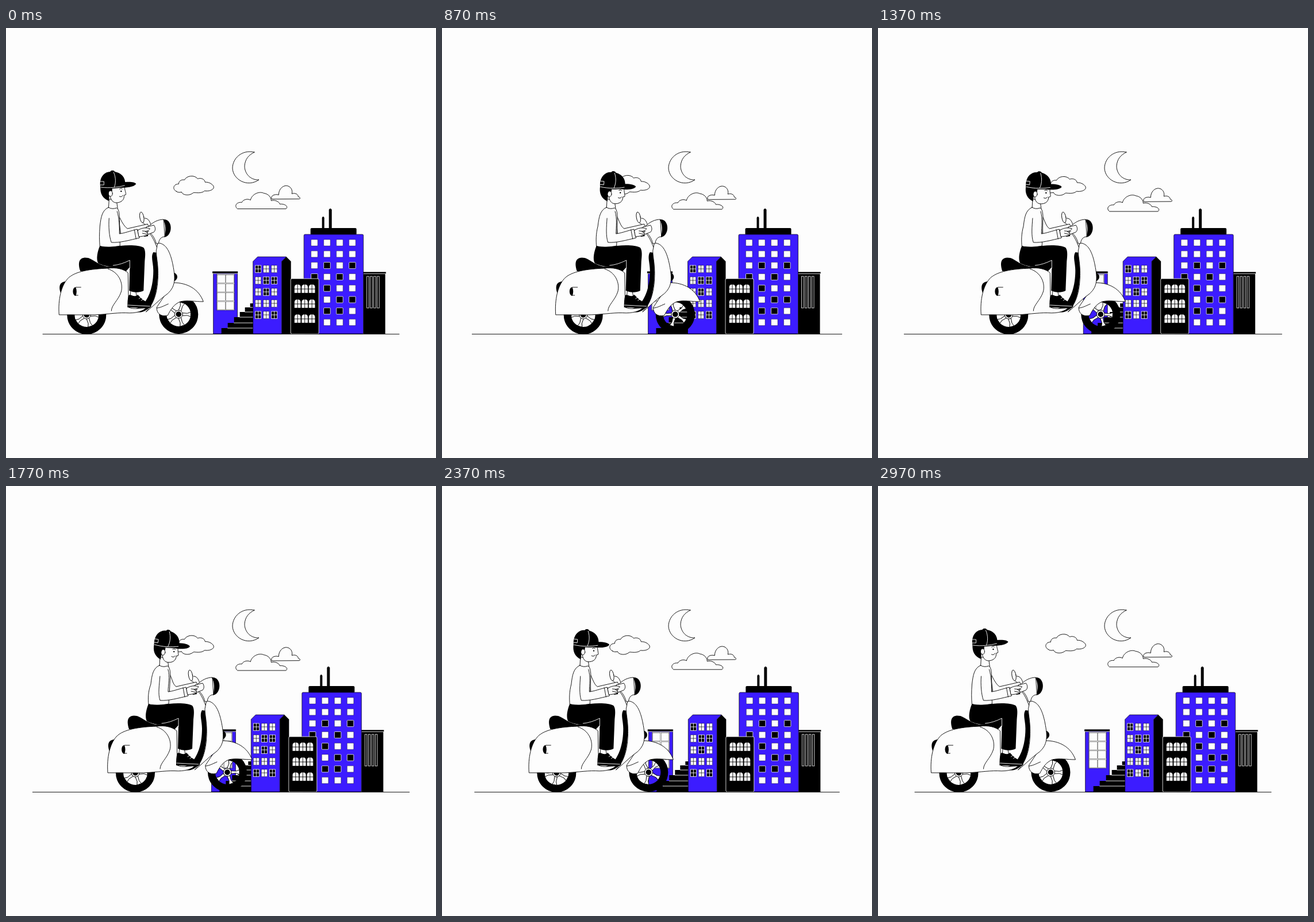
An HTML page that plays this animation: 748x748 px, repeating every 3000 ms.

```html
<!DOCTYPE html>
<html lang="en">
<head>
<meta charset="utf-8">
<title>Scooter ride</title>
<style>
  html, body { margin: 0; width: 100%; height: 100%; overflow: hidden; background: #fdfdfd; }
  svg { display: block; width: 100vw; height: 100vh; }
  .o { fill: #fdfdfd; stroke: #000; stroke-width: .9; stroke-linejoin: round; stroke-linecap: round; }
  .l { fill: none; stroke: #000; stroke-width: .9; stroke-linecap: round; }
  .w { fill: none; stroke: #fdfdfd; stroke-width: .9; stroke-linecap: round; }
  .b { fill: #3c1cff; stroke: #000; stroke-width: .7; }
  .p { fill: #fdfdfd; stroke: #000; stroke-width: .4; }
  .k { fill: #000; stroke: #fdfdfd; stroke-width: .8; }
</style>
</head>
<body>
<svg viewBox="0 0 748 748">
  <path class="o" d="M432 216C410 211 394 227 394 244C395 264 420 278 440 264C425 265 415 253 415 240C416 228 422 221 432 216Z"/>
  <path id="cloudA" class="o" d="M296 284C288 280 291 271 300 271C300 265 306 263 310 264C314 256 328 255 333 262C338 260 345 262 346 268C352 267 361 272 361 277C360 282 352 284 345 283C340 288 330 286 326 286C318 293 306 290 305 285C302 286 298 286 296 284Z"/>
  <g id="cloudB">
    <path class="o" d="M462 297C459 291 468 288 474 290C474 280 481 274 487 274C494 274 499 281 497 288C503 286 508 289 508 293C512 294 512 297 510 297Z"/>
    <path class="o" d="M402 314C396 309 401 302 410 303C412 298 420 296 425 299C427 289 440 283 448 287C456 288 461 294 461 300C468 298 475 302 476 306C484 305 492 310 487 314Z"/>
  </g>

  <g id="city"></g>
  <path id="ground" class="l"/>

  <g id="ride">
    <g id="wheels"></g>

    <!-- front fender, horn and leg shield -->
    <path d="M290 425C300 427 300 438 291 441Z"/>
    <path class="o" d="M291 443C315 443 335 454 343 476C328 476 315 473 303 476C292 480 286 490 281 500C269 503 261 496 262 486Z"/>
    <path class="l" d="M262 487C268 487 275 483 282 480"/>
    <path d="M256 390C251 398 256 408 256 422C256 448 249 471 235 484L219 491C230 498 243 494 250 485C264 468 266 425 263 391Z"/>
    <path class="o" d="M264 374C279 374 286 392 290 412C295 437 294 450 281 462C268 471 255 485 243 494C256 481 263 462 264 435C265 411 261 399 261 388Z"/>

    <!-- tail, seat and cowl -->
    <path d="M108 441C97 440 92 445 93 454C94 461 96 464 98 465Z"/>
    <path d="M129 423C123 405 129 397 143 400C152 403 160 412 176 415L214 417L205 427Z"/>
    <path class="o" d="M92 498.500C90 472 96 448 107 436C119 423 148 419 177 418C190 416 205 419 212 426L213 486C223 490 232 487 243 487C239 492 226 497 208 495.500C190 495 170 499 146 499Z"/>
    <path class="l" d="M177 419C197 425 204 445 200 459C195 474 183 482 183 492"/>
    <path class="l" d="M121 451H130M121 465H125"/>
    <path d="M121 451C115 450 114 465 121 466C123 461 123 456 121 451Z"/>

    <!-- handlebar, lamp and mirror -->
    <path class="l" d="M241 331C247 330 251 338 252 344M238 339L247 346"/>
    <ellipse class="o" cx="236" cy="329.500" rx="3.500" ry="9.500" transform="rotate(-10 236 329.500)"/>
    <path class="l" d="M249 357C254 362 258 371 262 381"/>
    <path class="o" d="M248 345C256 337 265 333 274 333L276 363C270 363 266 367 265 375L261 375C259 366 254 359 249 355Z"/>
    <path d="M273 333C290 331 291 361 275 364C278 353 278 342 273 333Z"/>

    <!-- rider -->
    <path class="o" d="M217 455L215 472H228L225 456Z"/>
    <path d="M213 465C217 462 222 470 229 464C235 471 242 476 250 480C254 483 252 487 249 487L211 486C211 478 211 471 213 465Z"/>
    <path class="w" d="M212 482L250 484M231 471L236 467M235 474L240 471"/>
    <path id="farArm" class="o"/>
    <path id="neck" class="o"/>
    <path id="torso" class="o"/>
    <path d="M163 379C174 382 187 381 198 379C215 377 232 378 239 382C243 387 242 396 241 406L239 457C231 461 221 460 214 457L215 417C198 419 170 415 160 409C156 402 159 388 163 379Z"/>
    <path class="w" d="M215 418V404C205 409 196 412 186 413"/>
    <path id="arm" class="o"/>
    <path class="l" d="M223 351L226 367"/>
    <path d="M238 352L246 357L247 362L240 363Z"/>
    <path class="o" d="M244 346L257 343C260 347 260 352 257 355L247 359Z"/>
    <path class="o" d="M229 352C236 347 244 347 250 349C248 353 245 353 242 354L247 358C246 361 241 362 231 363Z"/>
    <path class="l" d="M237 353L248 354M237 357L245 359"/>

    <g id="head">
      <path class="o" d="M180 276H206C206 283 209 287 208 290L205 291C206 299 200 304 191 304C183 303 179 295 180 276Z"/>
      <path d="M164 276C163 288 168 297 179 301C179 294 179 290 182 287C186 284 184 280 184 276Z"/>
      <ellipse class="o" cx="181.500" cy="288" rx="3.500" ry="5"/>
      <circle cx="200" cy="284" r="1.200"/>
      <path class="l" d="M197 293Q201 295 203 291M197 280Q200 278 202 280"/>
      <path d="M164 277C161 261 170 250 181 250C182 247 188 247 189 250C200 252 206 259 207 268C216 267 224 268 226 271C223 277 208 278 198 278C186 280 174 280 164 277Z"/>
      <path class="w" d="M187 251C191 260 191 270 188 277M165 277C180 279 194 277 206 274M164 267H170V273H164"/>
    </g>
  </g>
</svg>
<script>
const $ = id => document.getElementById(id);
const set = (id, name, value) => $(id).setAttribute(name, value);
const rect = (c, x, y, w, h, r = 0) =>
  `<rect class="${c}" x="${x}" y="${y}" width="${w}" height="${h}" rx="${r}"/>`;
const path = (c, d) => `<path class="${c}" d="${d}"/>`;

// Calls cell(x, y, isDark) for each window; dark lists cell indexes row by row.
function grid(xs, ys, dark, cell) {
  return ys.flatMap((y, r) => xs.map((x, c) => cell(x, y, dark.includes(r * xs.length + c)))).join('');
}
const steps = (start, gap, n) => Array.from({ length: n }, (_, i) => start + gap * i);

function buildCity() {
  const house = rect('b', 361, 427, 42, 105) + rect('k', 359, 423, 45, 4, 1) +
    rect('p', 367, 428, 30.5, 63) +
    grid([368, 383], steps(429.5, 15.5, 4), [], (x, y) => rect('p', x, y, 13.5, 14));

  const stairs = path('', 'M375 532V522H386V513H397V503H407V494H416V486H425V479H431V532Z') +
    path('w', 'M386 522H431M397 513H431M407 503H431M416 494H431M425 486H431');

  const block = path('b', 'M430 532V406L438 398H488L480 406V532Z') +
    path('', 'M480 532V406L488 398L496 406V532Z') +
    grid([434, 448, 462], steps(413, 20, 5), [0, 4, 5, 7, 12, 14], (x, y, dark) =>
      rect(dark ? 'k' : 'p', x, y, 10, 12.5) +
      path(dark ? 'w' : 'b', `M${x} ${y + 6}h10m-5 -6v12`));

  const tower = path('', 'M550 349V330q2 -4 4 0V349ZM562 349V316q2.500 -4 5 0V349Z') +
    rect('', 530, 348, 80, 12, 2) + rect('b', 518.5, 359, 103.5, 173, 2) +
    grid(steps(531, 22, 4), steps(368, 19.8, 8), [9, 11, 12, 14, 17, 22, 23, 25, 26],
      (x, y, dark) => rect(dark ? 'k' : 'p', x, y, 11.5, 11, 1));

  const arches = rect('k', 495.5, 436, 49, 96, 2) +
    grid([502, 514.5, 527], steps(446, 26, 3), [], (x, y) =>
      path('p', `M${x} ${y + 15}v-10q0 -5 5.500 -5t5.500 5v10z`) +
      path('l', `M${x} ${y + 8}h11m-5.500 -8v15`));

  const hall = rect('', 622, 427, 38, 105) + rect('k', 621, 424, 40.5, 3.5) +
    steps(628, 6, 4).map(x => rect('k', x, 432, 3.5, 55)).join('');

  $('city').innerHTML = house + stairs + block + hall + tower + arches;
}

function buildWheels() {
  const spokes = steps(18, 72, 5).map(a =>
    `<path class="o" transform="rotate(${a})" d="M-2.500 -5L-1.800 -15L-4 -21H4L1.800 -15L2.500 -5Z"/>`).join('');
  $('wheels').innerHTML = [[140, 499], [300, 498]].map(([x, y]) =>
    `<g transform="translate(${x} ${y})">
      <circle r="27.500" fill="none" stroke="#000" stroke-width="13"/>
      <g class="spin">${spokes}<circle class="o" r="7"/><circle r="4.800"/></g>
    </g>`).join('');
}

// Eased value at time t through [time, value] keys.
function at(t, keys) {
  const i = keys.findIndex(k => k[0] > t);
  const [t0, a] = keys[i - 1], [t1, b] = keys[i];
  return a + (b - a) * (1 - Math.cos(Math.PI * (t - t0) / (t1 - t0))) / 2;
}
const wave = (t, peak) => Math.cos(2 * Math.PI * (t - peak) / 3000);

const travel = [[0, 0.3], [900, 106], [1500, 85], [2000, 85], [3000, 0.3]];
const nod = [[0, 0], [1000, 5.5], [1500, 6], [2000, 10.5], [2750, 0.3], [3000, 0]];
const stretch = [[0, 0], [1520, 19], [3000, 0]];

function draw(now) {
  const t = now % 3000;
  const x = at(t, travel), tilt = at(t, nod), g = at(t, stretch);
  const k = tilt * 0.45, s = v => v + k;

  set('ground', 'd', `M${64 - g} 532.5H${684 + g}`);
  set('city', 'transform', `translate(${-0.3 - g * 0.19} 0)`);
  set('cloudA', 'transform', `translate(0.4 ${1 + 2.3 * wave(t, 2100)})`);
  set('cloudB', 'transform', `translate(0.3 ${3 + 3.8 * wave(t, 1880)})`);
  set('ride', 'transform', `translate(${x} 0)`);
  document.querySelectorAll('.spin').forEach(e =>
    e.setAttribute('transform', `rotate(${x / 34 * 180 / Math.PI})`));

  // The shoulders slide forward by k while hips and hands stay on the scooter.
  set('neck', 'd', `M${s(179)} 298L${s(178)} 315H${s(194)}L${s(192)} 300Z`);
  set('torso', 'd', `M${s(178)} 312C${s(167)} 317 ${s(165)} 328 ${s(163)} 345C162 358 162 370 163 380
    C175 382 188 381 198 379L${s(197)} 330C${s(197)} 320 ${s(195)} 314 ${s(192)} 313Q${s(184)} 316 ${s(178)} 312Z`);
  set('farArm', 'd', `M${s(195)} 325C${s(201)} 337 205 345 211 349L246 341L248 346L200 360Z`);
  set('arm', 'd', `M${s(179)} 331C${s(178)} 345 179 362 183 373C197 374 215 369 232 365
    L228 350C216 353 205 357 197 358C197 346 ${s(197)} 332 ${s(193)} 319`);
  set('head', 'transform', `translate(${k + tilt * 0.1} ${tilt * 0.25}) rotate(${tilt} 188 302)`);

  requestAnimationFrame(loop);
}
const loop = () => draw(performance.now());

buildCity();
buildWheels();
loop();
</script>
</body>
</html>
```
